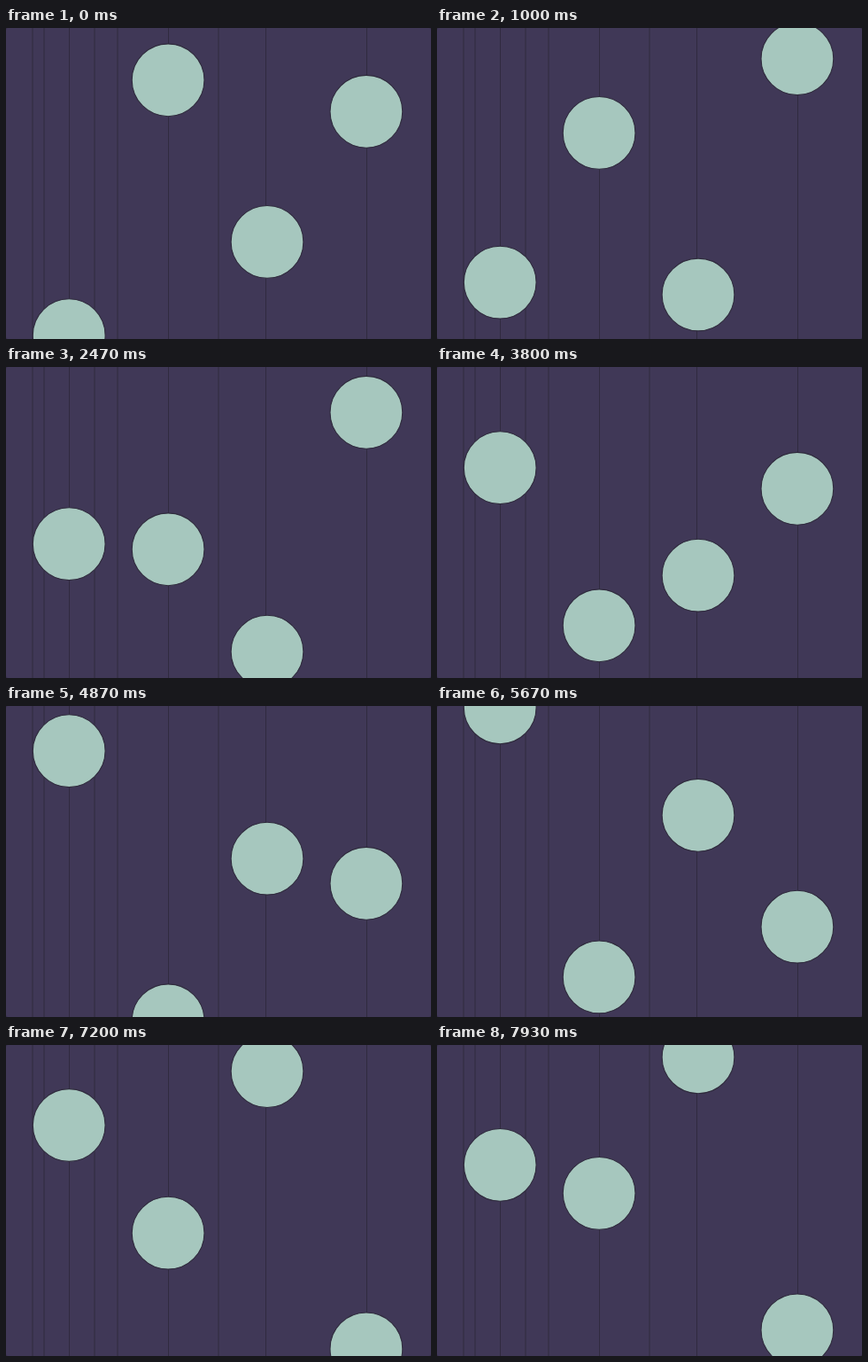
An HTML page for the animation above (8000 ms loop, 480 px wide and 351 px high).

```html
<!DOCTYPE html>
<html lang="en">
<head>
<meta charset="utf-8">
<title>Bouncing circles</title>
<style>
  html, body { margin: 0; width: 100%; height: 100%; overflow: hidden; background: #2f2942; }
  svg { display: block; width: 480px; height: 351px; }
  line { stroke: #2b2637; opacity: 0.75; }
  circle { fill: #a6c7be; stroke: #302c3e; stroke-width: 1.1; }
</style>
</head>
<body>
<svg id="stage" viewBox="0 0 480 351">
  <rect width="480" height="351" rx="2" fill="#403857"/>
</svg>
<script>
const stage = document.getElementById('stage');
const LOOP = 8000, FPS = 15;
const TOP = -0.7, SPAN = 355.5;
const FIRST_X = 71.2, GAP = 111.9, RADIUS = 40.9;

const lineXs = [30, 43, 71.5, 100, 126, 183.5, 240, 293.5, 407.5];

// Distance along the bounce at time 0: down over SPAN, then back up
const starts = [363.6, 59.5, 242.1, 616];

// Nearly steady speed: [time in ms, distance travelled]
const travel = [[0, 0], [2467, 147], [3800, 233], [4867, 296], [LOOP, 487.5]];

function add(name, attrs) {
  const node = document.createElementNS('http://www.w3.org/2000/svg', name);
  for (const key in attrs) node.setAttribute(key, attrs[key]);
  return stage.appendChild(node);
}

function distanceAt(time) {
  const next = travel.findIndex(([t]) => t > time);
  const [t0, d0] = travel[next - 1], [t1, d1] = travel[next];
  return d0 + (d1 - d0) * (time - t0) / (t1 - t0);
}

function bounce(distance) {
  const phase = distance % (2 * SPAN);
  return TOP + SPAN - Math.abs(SPAN - phase);
}

for (const x of lineXs) add('line', { x1: x, x2: x, y1: 0, y2: 351 });
const circles = starts.map((_, i) => add('circle', { cx: FIRST_X + i * GAP, r: RADIUS }));

const begin = performance.now();

function draw(now) {
  const time = Math.max(0, now - begin) % LOOP;
  // Step times are rounded to 10 ms, so allow a few ms of slack
  const step = Math.min(LOOP * FPS / 1000 - 1, Math.floor((time + 4) * FPS / 1000));
  const distance = distanceAt(step * 1000 / FPS);
  circles.forEach((circle, i) => circle.setAttribute('cy', bounce(starts[i] + distance).toFixed(2)));
  requestAnimationFrame(draw);
}
draw(begin);
</script>
</body>
</html>
```
